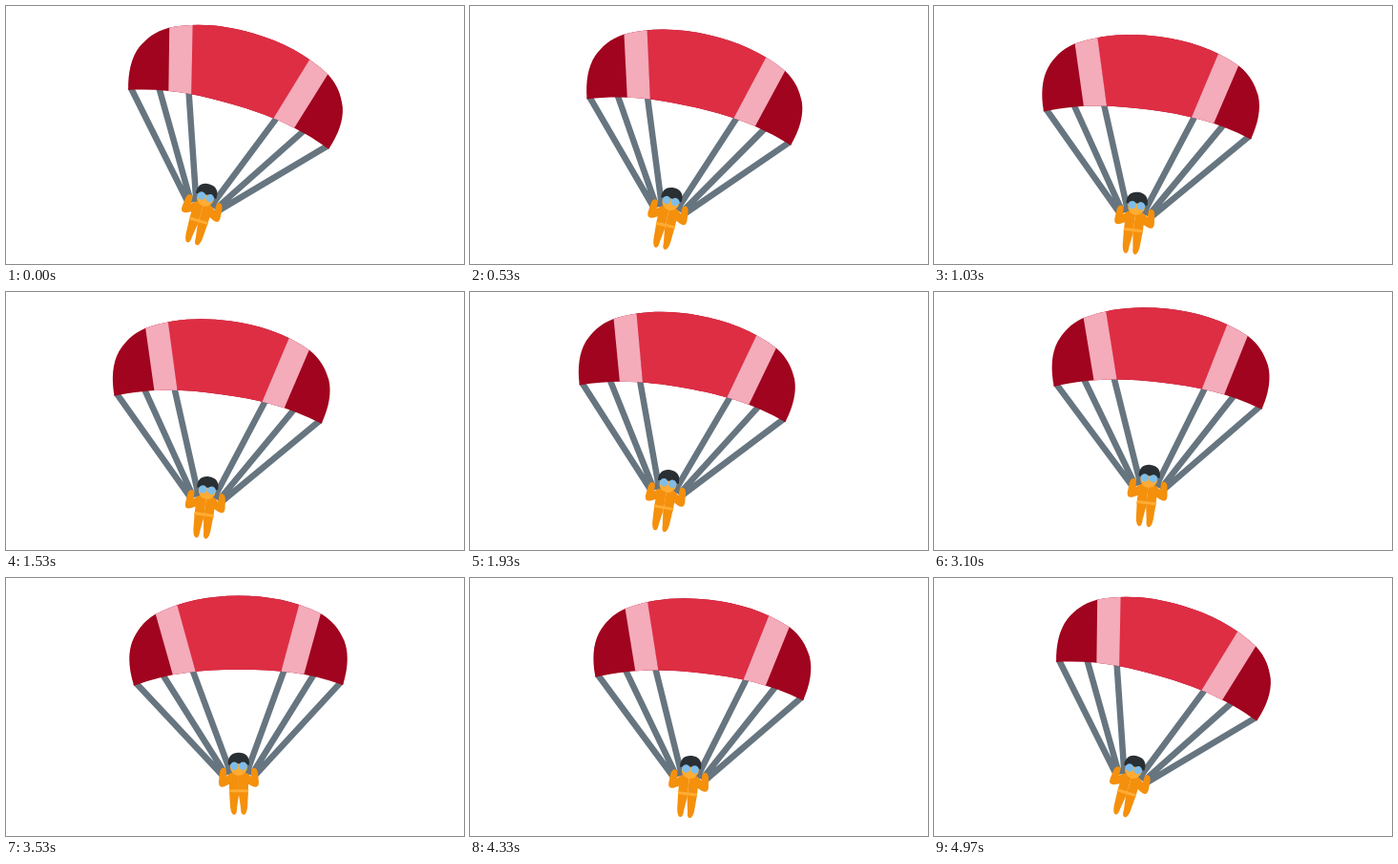
Recreate the animation shown at these times as an HTML page. Size 480 by 270 pixels, loop 5.01 s.

```html
<!DOCTYPE html>
<html lang="en">
<head>
<meta charset="utf-8">
<title>Parachute</title>
<style>
  html, body { margin: 0; width: 100%; height: 100%; overflow: hidden; background: #fff; }
  svg { display: block; width: 100vw; height: 100vh; }
</style>
</head>
<body>
<svg viewBox="0 0 480 270">
  <defs>
    <clipPath id="canopy">
      <path d="M-109.500 .5C-115-17-116-33-111-46C-106-57-100-66-87-74C-60-88-30-93.300 0-93.300
        S60-88 87-74C100-66 106-57 111-46C116-33 115-17 109.500 .5C72-13 38-16 0-16S-72-13-109.500 .5Z"/>
    </clipPath>
    <g id="cords">
      <path fill="none" stroke="#66757f" stroke-width="6.5" d="M-108-3L-15 97M-80-12L-13 95M-49-18L-8 93"/>
    </g>
    <path id="stripe" fill="#f4abba" d="M-89-83L-66.500-93L-44-11L-68-8Z"/>
    <g id="half" fill="#f4900c">
      <path d="M0 92H-8L-13 96V91Q-13 87-16 87T-20 92L-21 102Q-21 109-14 106L-10 104V113H0Z"/>
      <path d="M-10 111L-9 128Q-8 136-5 136T-2 129L0 115V111Z"/>
    </g>
  </defs>
  <g id="glider">
    <use href="#cords"/>
    <use href="#cords" transform="scale(-1 1)"/>
    <g clip-path="url(#canopy)">
      <path fill="#a0041e" d="M-120-96H120V4H-120Z"/>
      <path fill="#dd2e44" d="M-68-96H68L44-11H-44Z"/>
      <use href="#stripe"/>
      <use href="#stripe" transform="scale(-1 1)"/>
    </g>
    <use href="#half"/>
    <use href="#half" transform="scale(-1 1)"/>
    <path fill="#ffac33" d="M-10 109.500H10V112.500H-10Z"/>
    <circle cy="86" r="9" fill="#ffac33"/>
    <path fill="#292f33" d="M-11 84C-12 75 -7 71 0 71S12 75 11 84Q0 81-11 84Z"/>
    <g fill="#7fbde9">
      <circle cx="-4.600" cy="85" r="4.200"/>
      <circle cx="4.600" cy="85" r="4.200"/>
    </g>
  </g>
</svg>
<script>
const LOOP = 5010;
// The four turning points of the swing, a quarter loop apart: x, y, tilt in degrees
const keys = [
  [233.3, 118.3, 16.4],
  [222.7, 124.4, 6.9],
  [225.7, 111, 12.7],
  [245, 112.4, -1.3]
];
const glider = document.getElementById('glider');
const key = i => keys[(i + 4) % 4];

// Drift direction at a turning point; the path has a corner at the first one
const handle = i => [0, 1].map(k => i % 4 ? (key(i + 1)[k] - key(i - 1)[k]) / 6 : 0);

// Curved path from each turning point to the next
const legs = keys.map((from, i) => {
  const to = key(i + 1), out = handle(i), into = handle(i + 1);
  const path = document.createElementNS('http://www.w3.org/2000/svg', 'path');
  path.setAttribute('d', `M${from[0]},${from[1]}
    C${from[0] + out[0]},${from[1] + out[1]} ${to[0] - into[0]},${to[1] - into[1]} ${to[0]},${to[1]}`);
  return path;
});

function draw() {
  const turn = performance.now() % LOOP / LOOP * 4;
  const i = Math.floor(turn);
  const ease = (1 - Math.cos((turn - i) * Math.PI)) / 2;
  const { x, y } = legs[i].getPointAtLength(ease * legs[i].getTotalLength());
  const tilt = key(i)[2] + (key(i + 1)[2] - key(i)[2]) * ease;
  glider.setAttribute('transform', `translate(${x} ${y}) rotate(${tilt})`);
  requestAnimationFrame(draw);
}
draw();
</script>
</body>
</html>
```
